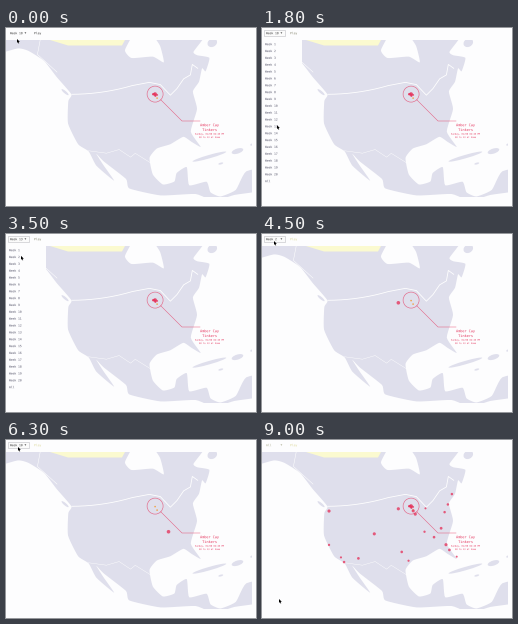
A matplotlib script that plays this animation: 250x178 px, repeating every 9300 ms.

```python
import numpy as np
import matplotlib.pyplot as plt
from matplotlib.animation import FuncAnimation
from matplotlib.patches import Circle, Ellipse, PathPatch, Polygon, Rectangle
from matplotlib.textpath import TextPath
from matplotlib.transforms import Affine2D

W, H = 250, 178
LOOP, TICK = 9300, 100
PX = 0.72  # points per pixel
PAGE, LAND, RED, INK = "#fdfdfe", "#dfdfec", "#e5375f", "#333333"
HOME, NORTHERN, MUSIC = (-88.0, 44.5), (-93.3, 45.0), (-86.8, 36.2)
rng = np.random.default_rng(4)

# Key points of the mainland coast as lon, lat, counter-clockwise from Alaska
COAST = [
    (-168, 65), (-161, 60), (-164, 55), (-152, 60.5), (-146, 60.7), (-137, 58.5),
    (-130, 54), (-123, 49), (-124.3, 47), (-124.3, 40.5), (-120.6, 34.5),
    (-117, 32.3), (-114.8, 28), (-109.7, 23), (-112.5, 28), (-114.5, 31.5),
    (-112.2, 29), (-106, 23), (-105.5, 20), (-97, 15.8), (-87.5, 12.8),
    (-83.5, 8.5), (-78, 7.5), (-70, 4), (-64, 8), (-72, 12.2), (-77, 8.7),
    (-81.5, 9), (-83.5, 11.5), (-83.3, 15), (-88.3, 16), (-87, 21.4),
    (-90.5, 20.8), (-92, 18.6), (-95.5, 18.8), (-97.6, 22.5), (-97.2, 27.5),
    (-94, 29.5), (-89.3, 29.4), (-84.3, 30), (-82.5, 27.7), (-80.5, 25.2),
    (-81.3, 30.5), (-75.8, 35.5), (-74, 40.5), (-70, 42), (-66, 44.8),
    (-65.5, 43.5), (-61, 46), (-64.5, 48.7), (-65, 50.2), (-56.5, 52), (-61, 57),
    (-65, 60), (-70, 59), (-77.5, 62.4), (-77, 57), (-79, 52), (-82.5, 55),
    (-92.5, 57), (-94.5, 60), (-87, 64.5), (-88, 68), (-115, 69), (-141, 70),
    (-158, 71)]

# lon, lat, length and width in pixels, tilt
ISLANDS = [(-79.4, 21.5, 35, 3.4, -16), (-71.2, 18.9, 12, 5, -18),
           (-77.3, 18.1, 5, 1.8, -15), (-66.5, 18.2, 4, 2, -20),
           (-125.8, 49.6, 9, 2.4, 40), (-56, 48.9, 10, 8, -30)]

NORTH = [(-122.8, 49), *((x, 49) for x in range(-120, -94, 3)), (-88.5, 48.3),
         (-84.5, 46.5), (-82.5, 42.5), (-79, 43.4), (-74.7, 45), (-71.5, 45),
         (-68.5, 47.3), (-67.5, 45.5)]
SOUTH = [(-117.1, 32.5), (-111, 31.3), (-106.5, 31.8), (-103.2, 29),
         (-101.4, 29.8), (-97.2, 25.9)]
YUKON = [(-141, 69.7), (-141, 60.2), (-130, 55.5)]

CITIES = [
    NORTHERN, MUSIC, (-87.6, 41.9), (-87.9, 43), (-83, 42.3), (-84.4, 33.7),
    (-80.8, 35.2), (-81.7, 30.3), (-81.4, 28.5), (-80.2, 25.8), (-77, 38.9),
    (-74.5, 40.4), (-71.1, 42.4), (-122.3, 47.6), (-122.4, 37.8), (-118.2, 34.1),
    (-117.2, 32.7), (-112.1, 33.4), (-105, 39.7), (-96.8, 32.8), (-95.4, 29.8)]

MENU = [f"Week {i}" for i in range(1, 21)] + ["All"]
ROW = 6.85
# Each visit to the menu: opened ms, picked ms, item
VISITS = [(1000, 2000, "Week 13"), (3000, 3800, "Week 2"),
          (5000, 5800, "Week 10"), (6800, 7800, "All")]
STARTS = [0] + [picked for _, picked, _ in VISITS]
CHOICES = ["Week 18"] + [item for _, _, item in VISITS]


def project(points):
    """Albers equal-area conic in stage pixels."""
    lon, lat = np.radians(np.asarray(points, float)).T
    a, b = np.radians([29.5, 45.5])
    n = (np.sin(a) + np.sin(b)) / 2
    c = np.cos(a) ** 2 + 2 * n * np.sin(a)
    rho = 197 * np.sqrt(c - 2 * n * np.sin(lat)) / n
    turn = n * (lon + np.radians(123))
    return np.column_stack([65.4 + rho * np.sin(turn), rho * np.cos(turn) - 150.8])


def smooth(p, steps=6, pull=0.25):
    """Closed cubic curve through the points."""
    q = np.roll(p, -1, axis=0)
    m = pull * (q - np.roll(p, 1, axis=0))
    mq = np.roll(m, -1, axis=0)
    u = np.arange(steps)[None, :, None] / steps
    p, q, m, mq = (v[:, None] for v in (p, q, m, mq))
    ease = u * u * (3 - 2 * u)
    curve = p + (q - p) * ease + m * u * (1 - u) ** 2 - mq * u * u * (1 - u)
    return curve.reshape(-1, 2)


fig = plt.figure(figsize=(W / 100, H / 100), dpi=100, facecolor=PAGE)
ax = fig.add_axes([0, 0, 1, 1])
ax.set(xlim=(0, W), ylim=(H, 0))
ax.axis("off")


def label(x, y, text, size, color, center=False):
    path = TextPath((0, 0), text, size=size, prop={"family": "DejaVu Sans Mono"})
    if center:
        box = path.get_extents()
        x -= (box.x0 + box.x1) / 2
    path = path.transformed(Affine2D().scale(1, -1).translate(x, y))
    return ax.add_patch(PathPatch(path, fc=color, lw=0, zorder=8))


def draw_map():
    frame = Rectangle((0, 12), 246, 157, transform=ax.transData)
    shapes = [Polygon(smooth(project(COAST)), fc=LAND, lw=0)]
    for lon, lat, length, width, tilt in ISLANDS:
        center = project([(lon, lat)])[0]
        shapes.append(Ellipse(center, length, width, angle=tilt, fc=LAND, lw=0))
    # Pale strip along the northern edge
    shapes.append(Polygon([(44, 12), (62, 17.5), (116, 17.5), (119, 12)],
                          fc="#fbfad0", lw=0))
    for shape in shapes:
        ax.add_patch(shape).set_clip_path(frame)
    for border, width in ((NORTH, 0.8), (SOUTH, 0.4), (YUKON, 0.5)):
        line, = ax.plot(*project(border).T, color="white", lw=width * PX)
        line.set_clip_path(frame)


def draw_callout():
    x, y = project([HOME])[0]
    ax.add_patch(Circle((x, y), 8, fc="none", ec=RED, lw=0.6 * PX, alpha=0.75, zorder=4))
    for dx, dy in ((0, 0.5), (2, 4)):
        ax.add_patch(Circle((x + dx, y + dy), 0.8, fc="#f0a040", lw=0, zorder=4))
    ax.plot([x + 5.7, 176, 194], [y + 5.7, 93, 93], color=RED, lw=0.5 * PX, alpha=0.8)
    for base, size, text in ((98.2, 3.5, "Amber Cay"), (103, 3.5, "Tinkers"),
                             (106.7, 2.2, "Sunday, 01/08 04:40 PM"),
                             (110, 2.2, "38 to 13 at home")):
        label(203.5, base, text, size, RED, center=True)


def make_panel():
    back = Rectangle((0, 11), 39.5, 147, fc=PAGE, lw=0, zorder=6)
    rows = [label(3, 17.2 + ROW * i, text, 3, "#55556a") for i, text in enumerate(MENU)]
    return [ax.add_patch(back)] + rows


def make_dots(places, sizes):
    return [(ax.add_patch(Circle(xy, r, fc=RED, lw=0, alpha=0.8, zorder=5)), r)
            for xy, r in zip(places, sizes)]


def make_shows():
    cluster = project([HOME]) + np.vstack([[0, 0], rng.normal(0, 1.2, (7, 2))])
    sizes = [1.9] + [1.0] * 7
    towns = rng.uniform(0.9, 1.6, len(CITIES))
    everywhere = np.vstack([cluster, project(CITIES)])
    return [make_dots(cluster, sizes), make_dots(cluster, sizes),
            make_dots(project([NORTHERN]), [1.8]), make_dots(project([MUSIC]), [1.8]),
            make_dots(everywhere, [*sizes, *towns])]


def pointer_keys():
    """ms, x, y: to the select, down to the item, back up, and away at the end."""
    keys = [(0, 11, 11)]
    for opened, picked, item in VISITS:
        y = 15 + ROW * MENU.index(item)
        keys += [(opened - 500, 12, 7), (opened, 13, 7),
                 (picked - 300, 15, y), (picked, 15, y), (picked + 500, 13, 7)]
    keys[-1] = (8500, 17, 159)
    return np.array(keys).T


draw_map()
draw_callout()
panel = make_panel()
shows = make_shows()
names = [label(4, 6.2, name, 3, INK) for name in CHOICES]
select = ax.add_patch(Rectangle((1.5, 1.5), 21, 6.5, fc="#fbfbfb", ec="#c4c4c8",
                                lw=0.6 * PX, zorder=7))
caret = ax.add_patch(Polygon([(18.5, 4.4), (20.3, 4.4), (19.4, 5.7)], lw=0, zorder=8))
play = label(28, 6.2, "Play", 3, INK)
ARROW = np.array([(0, 0), (0, 3.9), (0.9, 3.1), (1.6, 4.6), (2.2, 4.3),
                  (1.6, 2.9), (2.8, 2.8)])
pointer = ax.add_patch(Polygon(ARROW, fc="black", lw=0, zorder=10))
key_ms, key_x, key_y = pointer_keys()


def hold(t):
    """Time of the step on show at t: steps last 300 and 200 ms in turn."""
    base, rest = divmod(t, 500)
    late = rest >= 300 and base != 1
    return base * 500 + (300 if late else 0)


def draw(i):
    t = hold(i * TICK)
    now = max(k for k, start in enumerate(STARTS) if start <= t)
    grow = min(1, (t - STARTS[now] + 200) / 500) if now else 1
    for k, dots in enumerate(shows):
        names[k].set_visible(k == now)
        for dot, r in dots:
            dot.set_visible(k == now)
            dot.set_radius(r * grow)

    is_open = any(a <= t < b for a, b, _ in VISITS)
    for part in panel:
        part.set_visible(is_open)
    select.set_visible(500 <= t < STARTS[-1])
    for part in (names[now], caret):
        part.set_facecolor("#a8a88c" if t >= 8300 else INK)
    if is_open:
        tone = "#85856e"
    else:
        tone = INK if t < 1000 else "#dcd898"
    play.set_facecolor(tone)

    spot = [np.interp(t, key_ms, key_x), np.interp(t, key_ms, key_y)]
    pointer.set_xy(ARROW + spot)
    return []


anim = FuncAnimation(fig, draw, frames=LOOP // TICK, interval=TICK,
                     repeat=True, repeat_delay=0, blit=False)
plt.show()
```
